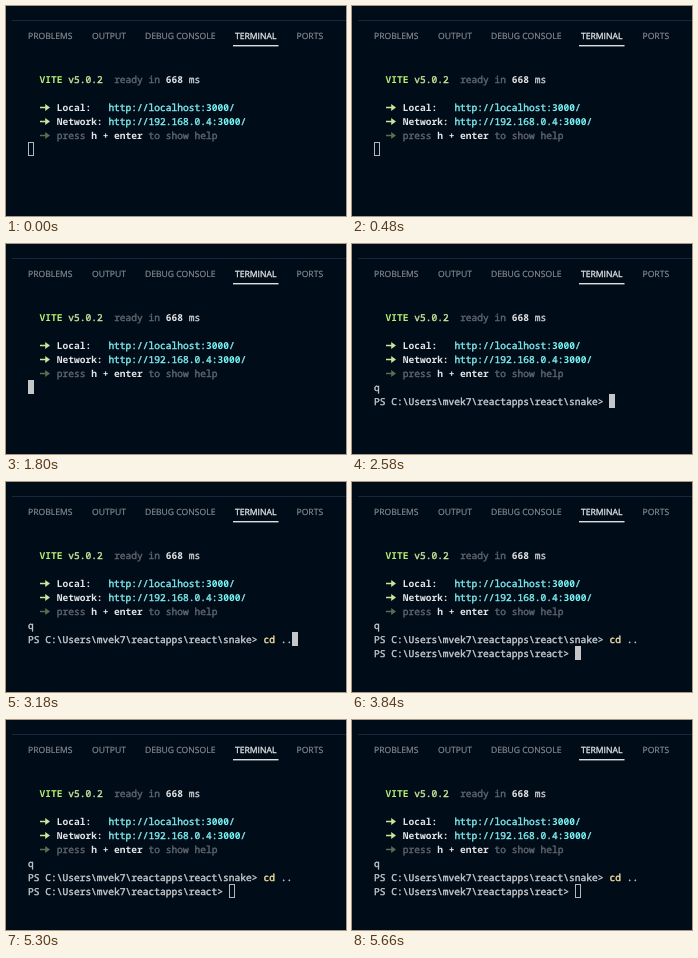
Recreate the animation shown at these times as an HTML page. Size 340 by 210 pixels, loop 5720 ms.

```html
<!DOCTYPE html>
<html lang="en">
<head>
<meta charset="utf-8">
<title>Terminal session</title>
<style>
  html, body { margin: 0; width: 100%; height: 100%; overflow: hidden; background: #000c18; }
  svg { display: block; width: 340px; height: 210px; }
  text { white-space: pre; text-rendering: geometricPrecision; fill: currentColor; stroke: currentColor; }
  .tab { font: 8.6px "Open Sans", "Noto Sans", sans-serif; color: #848a91; stroke-width: 0.2; }
  .tab.active { color: #e4e6e8; stroke-width: 0.3; }
  .mono { font: 9.57px "Noto Sans Mono", "DejaVu Sans Mono", monospace; stroke-width: 0.4; }
  .bold { font-weight: 700; stroke-width: 0; }
</style>
</head>
<body>
<svg id="stage" viewBox="0 0 340 210" xmlns="http://www.w3.org/2000/svg">
  <rect width="340" height="210" fill="#000c18"/>
  <rect x="6" y="14" width="334" height="1" fill="#1a2540"/>
</svg>
<script>
const LOOP = 5720;
const LEFT = 22, TOP = 66, CELL = 5.742, ROW = 14;
const COLOR = {
  green: '#c6e69a', brightGreen: '#b8f171', cyan: '#7eeef2', brightCyan: '#78f6f8',
  yellow: '#f6e3a0', white: '#c8cbce', bright: '#e2e4e6', dim: '#5f666e', dimGreen: '#5c6b52'
};
const stage = document.getElementById('stage');

function add(tag, attrs, content = '') {
  const node = document.createElementNS('http://www.w3.org/2000/svg', tag);
  for (const key in attrs) node.setAttribute(key, attrs[key]);
  node.textContent = content;
  return stage.appendChild(node);
}

const colX = col => LEFT + col * CELL;

function write(row, col, content, color = COLOR.white, bold = false) {
  return add('text', {
    x: colX(col), y: TOP + row * ROW + 11, class: bold ? 'mono bold' : 'mono', style: `color:${color}`
  }, content);
}

function arrow(row, color) {
  const y = TOP + row * ROW + 7.5;
  add('path', {
    d: `M34 ${y - 0.8}H39.2V${y - 3.4}L44 ${y}L39.2 ${y + 3.4}V${y + 0.8}H34Z`, fill: color
  });
}

const tabs = [[22, 'PROBLEMS'], [86, 'OUTPUT'], [139, 'DEBUG CONSOLE'], [229, 'TERMINAL'], [290.5, 'PORTS']];
for (const [x, label] of tabs) {
  add('text', { x, y: 33, class: label === 'TERMINAL' ? 'tab active' : 'tab' }, label);
}
add('rect', { x: 227, y: 39, width: 45.5, height: 1.4, fill: '#dcdee0' });

write(0, 2, 'VITE', COLOR.brightGreen, true);
write(0, 7, 'v5.0.2', COLOR.green);
write(0, 15, 'ready in', COLOR.dim);
write(0, 24, '668', COLOR.bright, true);
write(0, 28, 'ms', COLOR.white);

function address(row, label, host) {
  arrow(row, COLOR.green);
  write(row, 5, label, COLOR.bright, true);
  write(row, 14, host, COLOR.cyan);
  write(row, 14 + host.length, '3000', COLOR.brightCyan, true);
  write(row, 18 + host.length, '/', COLOR.cyan);
}
address(2, 'Local:', 'http://localhost:');
address(3, 'Network:', 'http://192.168.0.4:');

arrow(4, COLOR.dimGreen);
write(4, 5, 'press', COLOR.dim);
write(4, 11, 'h + enter', COLOR.bright, true);
write(4, 21, 'to show help', COLOR.dim);

const HOME = 'PS C:\\Users\\mvek7\\reactapps\\react';
const FIRST = HOME + '\\snake> ', SECOND = HOME + '> ';
const quit = write(5, 0, 'q');
const firstPrompt = write(6, 0, FIRST);
const command = write(6, FIRST.length, '', COLOR.yellow);
const argument = write(6, FIRST.length + 3, '');
const secondPrompt = write(7, 0, SECOND);
const cursor = add('rect', {});

// Key presses and prompt changes, in ms
const FOCUS = 1020, BLUR = 5060;
const QUIT = 2040, FIRST_READY = 2340;
const KEYS = [2720, 2800, 2880, 2960, 3080];
const ENTER = 3420, SECOND_READY = 3480;

const show = (node, on) => node.setAttribute('visibility', on ? 'visible' : 'hidden');

function cursorCell(t, typed) {
  if (t >= SECOND_READY) return [7, SECOND.length];
  if (t >= ENTER) return [7, 0];
  if (t >= FIRST_READY) return [6, FIRST.length + typed];
  return [5, t >= QUIT ? 1 : 0];
}

function render(t) {
  const typed = KEYS.filter(time => t >= time).length;
  show(quit, t >= QUIT);
  show(firstPrompt, t >= FIRST_READY);
  show(secondPrompt, t >= SECOND_READY);
  command.textContent = 'cd'.slice(0, typed);
  argument.textContent = '..'.slice(0, Math.max(0, typed - 3));

  const [row, col] = cursorCell(t, typed);
  const solid = t >= FOCUS && t < BLUR;
  const inset = solid ? 0 : 0.5;
  const box = {
    x: Math.round(colX(col)) + inset, y: TOP + row * ROW + inset,
    width: 6 - 2 * inset, height: 14 - 2 * inset,
    fill: solid ? '#c4c6c8' : 'none', stroke: solid ? 'none' : '#b4b8bc'
  };
  for (const key in box) cursor.setAttribute(key, box[key]);
}

const start = performance.now();
function tick() {
  render((performance.now() - start) % LOOP);
  requestAnimationFrame(tick);
}
tick();
</script>
</body>
</html>
```
